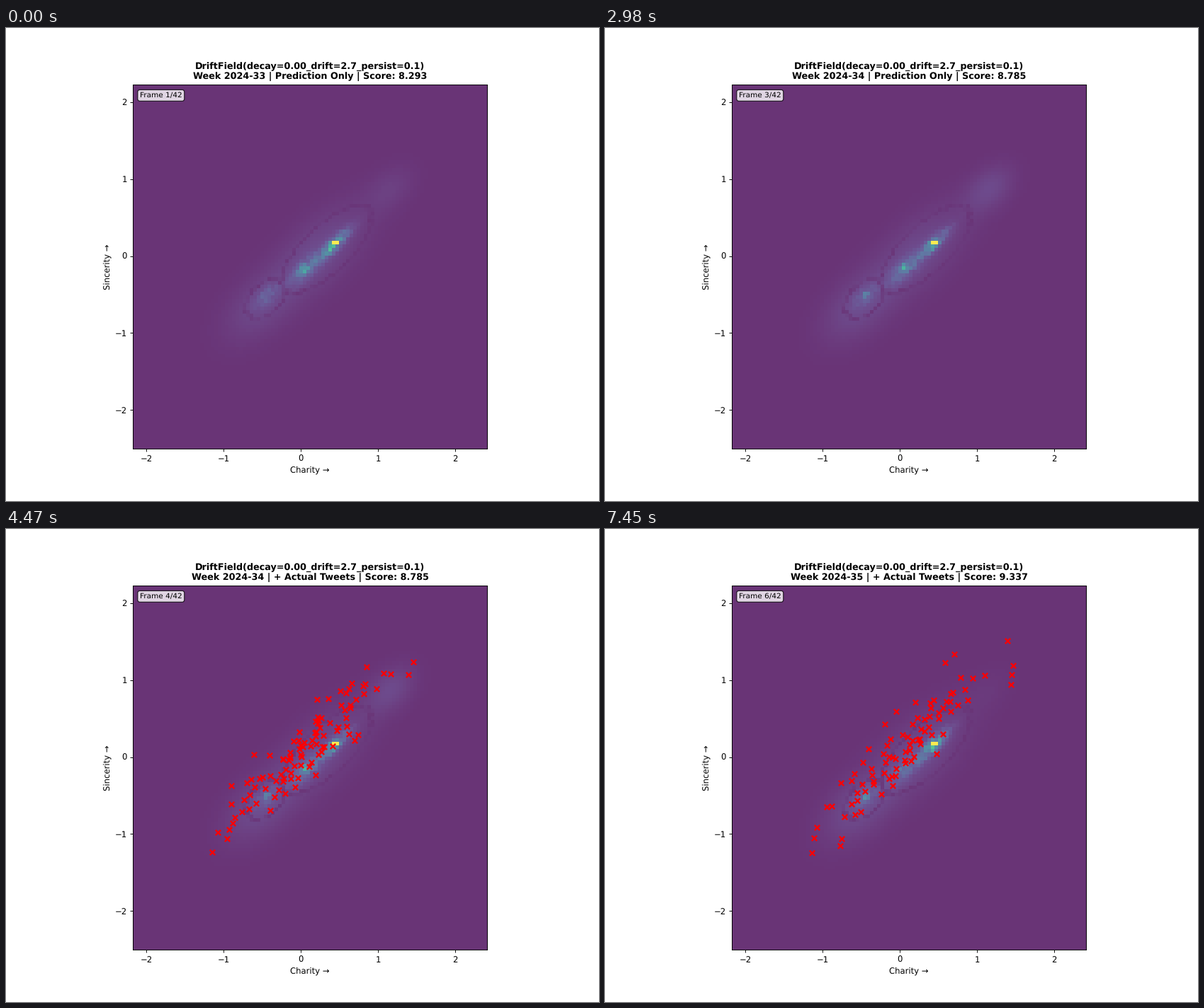
A matplotlib script that plays this animation: 837x669 px, repeating every 8000 ms.

```python
import numpy as np
import matplotlib.pyplot as plt
from matplotlib.animation import FuncAnimation

LOOP, STEP, HOLD = 8000, 40, 1490
DPI = 83.7
XLIM, YLIM = (-2.175, 2.414), (-2.504, 2.223)
CELLS = 100
TILT = np.radians(44)

plt.rcParams.update({"font.family": "DejaVu Sans", "text.hinting": "no_hinting"})


def centres(lim):
    edges = np.linspace(*lim, CELLS + 1)
    return (edges[:-1] + edges[1:]) / 2


GX, GY = np.meshgrid(centres(XLIM), centres(YLIM))


def radius(cx, cy, long, short):
    """Elliptic distance from a tilted centre; 1 lies on the outline."""
    dx, dy = GX - cx, GY - cy
    along = dx * np.cos(TILT) + dy * np.sin(TILT)
    across = dy * np.cos(TILT) - dx * np.sin(TILT)
    return np.hypot(along / long, across / short)


def blend(blobs, week):
    """Sum of Gaussians, each with one weight per week."""
    return sum(weights[week] * np.exp(-radius(*shape) ** 2 / 2)
               for shape, weights in blobs)


HALOS = [
    ((0.22, 0.02, 0.55, 0.25), (0.085, 0.08, 0.085)),
    ((-0.55, -0.68, 0.38, 0.23), (0.06, 0.07, 0.075)),
    ((1.15, 0.86, 0.25, 0.16), (0.04, 0.075, 0.015)),
]
CORES = [
    ((0.42, 0.14, 0.19, 0.05), (0.30, 0.24, 0.32)),
    ((0.41, 0.13, 0.07, 0.04), (0.30, 0.30, 0.30)),
    ((0.06, -0.18, 0.16, 0.07), (0.20, 0.20, 0.14)),
    ((0.03, -0.17, 0.04, 0.03), (0.45, 0.30, 0.10)),
    ((-0.44, -0.52, 0.14, 0.07), (0.10, 0.09, 0.10)),
    ((-0.44, -0.52, 0.04, 0.03), (0.05, 0.18, 0.25)),
]


def density(week):
    rng = np.random.default_rng(week)
    field = blend(HALOS, week)
    field += blend(CORES, week) * rng.uniform(0.5, 1.3, GX.shape)

    # Broken dark outlines around the two dense regions
    big = radius(0.33, 0.08, 0.75, 0.30)
    small = radius(-0.46, -0.56, 0.31, 0.19)
    edge = np.minimum(np.abs(big - 1) * 0.30, np.abs(small - 1) * 0.19)
    outline = (edge < 0.018) & (np.minimum(big, small) > 0.85)
    field[outline] *= rng.uniform(0.2, 0.8, outline.sum())

    field[(abs(GX - 0.44) < 0.046) & (abs(GY - 0.17) < 0.024)] = 1
    return np.clip(field, 0, 1)


def tweets(count, middle, spread, seed):
    """Points spaced evenly along the diagonal and scattered across it."""
    rng = np.random.default_rng(seed)
    rank = (np.arange(count) + rng.uniform(0, 1, count)) / count
    along = middle + spread * np.arctanh(1.9 * (rank - 0.5))
    across = rng.normal(0.04, 0.16, count).clip(-0.4, 0.45)
    return np.column_stack([along - across, along + across]) / np.sqrt(2)


FIELDS = [density(week) for week in range(3)]
POINTS = [tweets(115, 0.1, 1.15, 11), tweets(101, 0.1, 1.0, 12),
          tweets(87, 0.15, 1.1, 13)]
SCORES = ["8.293", "8.785", "9.337"]

fig, ax = plt.subplots(figsize=(837.05 / DPI, 669.05 / DPI), dpi=DPI)
image = ax.imshow(FIELDS[0], origin="lower", extent=(*XLIM, *YLIM),
                  cmap="viridis", vmin=0, vmax=1, alpha=0.8,
                  interpolation="nearest")
marks = ax.scatter([], [], marker="x", s=40, c="red", linewidths=2)
ax.set(xlim=XLIM, ylim=YLIM, xlabel="Charity →", ylabel="Sincerity →",
       xticks=range(-2, 3), yticks=range(-2, 3))
title = ax.set_title("", fontsize=11, fontweight="bold", linespacing=1.26)
counter = ax.text(0.02, 0.98, "", transform=ax.transAxes, fontsize=9, va="top",
                  bbox=dict(boxstyle="round,pad=0.3", facecolor="white", alpha=0.8))


def update(i):
    shot = min(((i + 1) * STEP - 1) // HOLD, 5)
    week, actual = divmod(shot, 2)
    image.set_data(FIELDS[week])
    marks.set_offsets(POINTS[week] if actual else np.empty((0, 2)))
    mode = "+ Actual Tweets" if actual else "Prediction Only"
    title.set_text("DriftField(decay=0.00_drift=2.7_persist=0.1)\n"
                   f"Week 2024-{33 + week} | {mode} | Score: {SCORES[week]}")
    counter.set_text(f"Frame {shot + 1}/42")
    return image, marks, title, counter


anim = FuncAnimation(fig, update, frames=LOOP // STEP, interval=STEP,
                     repeat=True, repeat_delay=0, blit=False)
plt.show()
```
